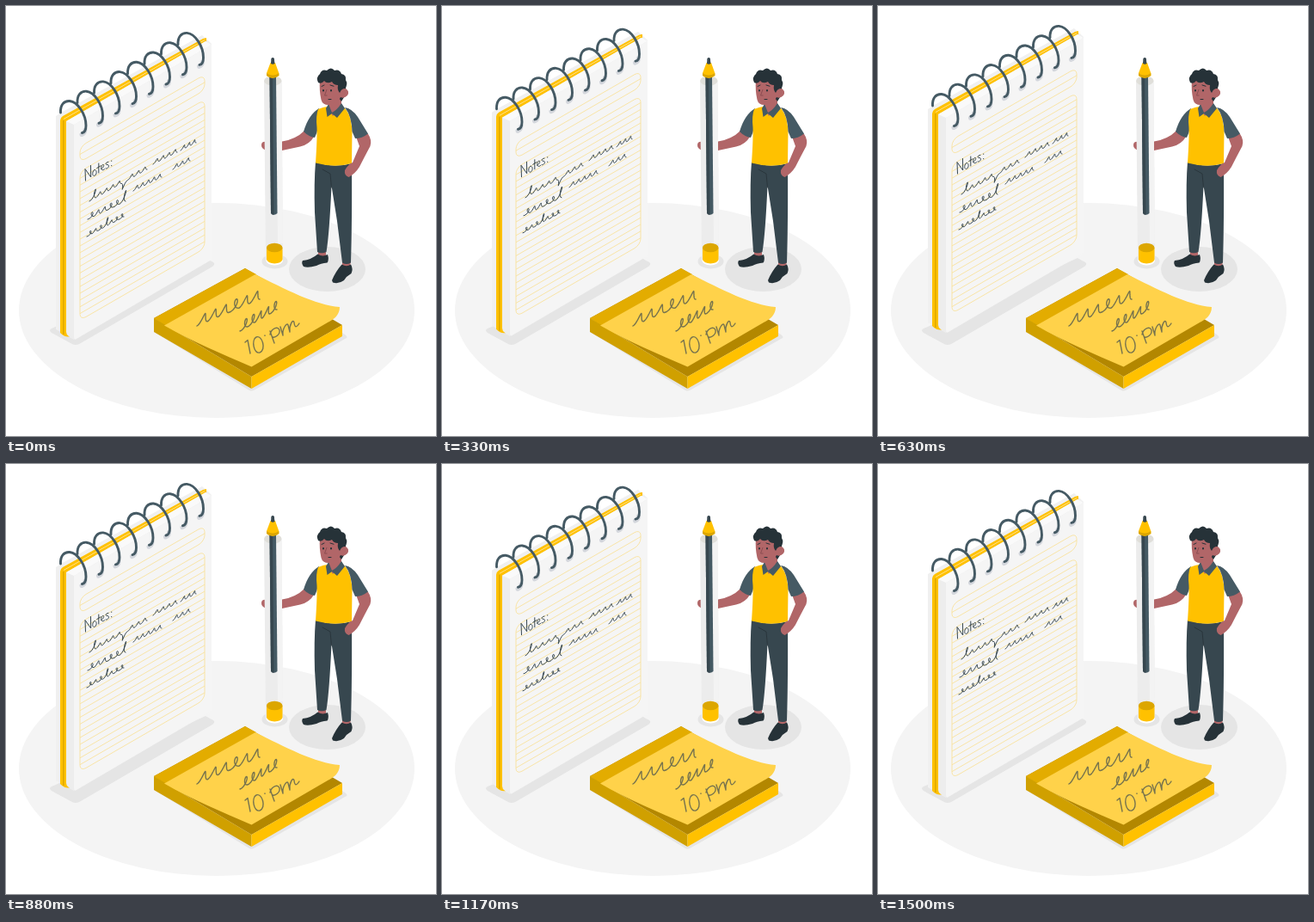
Write an HTML page that moves like this. It is 500x500 px and loops after 1.54 s.

```html
<!DOCTYPE html>
<html lang="en">
<head>
<meta charset="utf-8">
<title>Notes</title>
<style>
  html, body { margin: 0; width: 100%; height: 100%; overflow: hidden; background: #fff; }
  svg { display: block; width: 100%; height: 100%; }
  .ink { fill: none; stroke: #37474f; stroke-width: 1; stroke-linecap: round; stroke-linejoin: round; }
  .memo { stroke-width: 1.4; opacity: .68; }
  .rule { fill: none; stroke: #ffc100; stroke-width: .7; opacity: .4; }
  .line { fill: none; stroke: #263238; stroke-linecap: round; }
  .skin { fill: #b16668; }
  .navy { fill: #37474f; }
  .slate { fill: #455a64; }
  .black { fill: #263238; }
  .gold { fill: #ffc100; }
  .amber { fill: #dca600; }
  .shade { fill: #e5e5e5; }
</style>
</head>
<body>
<svg viewBox="0 0 500 500" role="img" aria-label="Notepad, pen, sticky notes and a man">
  <ellipse cx="245" cy="354" rx="230" ry="125" fill="#f4f4f4"/>
  <path class="shade" d="M53 375 L232 293 L241 298 Q244 300 240 303 L87 392 Q81 396 75 392 L53 380 Q49 377 53 375Z"/>

  <g id="pad">
    <path d="M58 128 L64 124 L228 34 L239 44 L79 388 L58 376Z" fill="#f0f0f0"/>
    <path class="gold" d="M63 133 Q63 130 66 128 L229 38 L233 37 V45 L71 138 V381 L75 384 Q69 386 63 380Z"/>
    <path d="M66.8 133 V382" fill="none" stroke="#e0a900" stroke-width="1.6"/>
    <path d="M67 131.5 L231 39.5" fill="none" stroke="#ffe08a"/>
    <path d="M70 134 L232 41 L239 45 L79 140 V388 L73 384 Q70 382 70 379Z" fill="#ededed"/>
    <path d="M70 134 L232 41 L239 45 L79 138Z" fill="#fafafa"/>
    <path d="M79 138 L239 45 V295 L82 387 Q79 389 79 385Z" fill="#f5f5f5"/>
    <g id="rules" class="rule" transform="matrix(1 -.577 0 1 86 0)"></g>
    <g id="script" class="ink">
      <path aria-label="Notes:" d="M92.5 203 L92 189.5 L98.7 199 L98.5 185.5 M103 190.5 C100 191.5 100 198 102.6 197.5 C106 196.5 106 190 103 190.5 M107.8 183 V194 M105.7 188.5 L110 185.8 M110.7 189.5 C114.5 187.5 114.3 183.5 112.3 184.5 C110 186 110 193.5 114.5 189.8 M119 181.3 C115 181.7 115.5 185 118 184.6 C121 184.5 119 189.8 116 189 M122.7 180 v.4 m0 5 v.4"/>
    </g>
    <g id="rings" fill="none" stroke-linecap="round"></g>
  </g>

  <g id="sticky">
    <path class="shade" d="M172 379 L283 447 Q285 448 288 447 L396 386 Q398 384 391 380Z"/>
    <path d="M172 363 L278 305 L391 371 L285.5 431Z" fill="#b38700"/>
    <path d="M172 363 L278 305 L291 312 L185 372Z" fill="#e3ac00"/>
    <path d="M172 363 L285.5 431 V445 L172 379Z" fill="#d0a000"/>
    <path class="gold" d="M285.5 431 L391 371 V384 L285.5 445Z"/>
    <path d="M184 371.5 L290 312 C324 329 360 348 388 350 C388 359 382 364 374 368 L285.5 419.5 C252 405 216 390 184 371.5Z" fill="#ffd24a"/>
    <g id="memo" class="ink memo">
      <path aria-label="10 pm" d="M278 391 L281 388.5 L284 404 M291 385 C285 388 288 405 295 403 C303 400 298 382 291 385 M301 383 v.4 M307 378 L312 392 M307 382 C309 374 317 372 318 377 C319 382 313 386 310 385 M319 373 L322 383 C321 375 327 367 328 371 L330 379 C329 371 334 363 335 368 Q336 377 341 369"/>
    </g>
  </g>

  <ellipse cx="373.5" cy="306" rx="44.500" ry="26" class="shade"/>
  <path class="skin" d="M303 158 Q297 157 297 162 Q297 166 303 168Z"/>

  <g id="pen">
    <ellipse class="shade" cx="312.5" cy="297" rx="15" ry="8.5"/>
    <path d="M300 87 Q310 78 320.5 87 L322 296 Q312 305 302 296Z" fill="#ececec"/>
    <path d="M314 91 L320.5 88 L322 276 H316Z" fill="#f3f3f3"/>
    <ellipse cx="310.3" cy="87" rx="10.2" ry="5.5" fill="#e0dfda"/>
    <path class="slate" d="M306.5 82 H314 L315.5 241 Q312 244.5 308 241Z"/>
    <path class="navy" d="M306.5 82 H310 L311.5 243 Q309 243 308 241Z"/>
    <path class="gold" d="M307.5 66 H313 L317.3 78 V81 Q310 86.5 303 81 V78Z"/>
    <path class="amber" d="M303 78 Q310 83 317.3 78 V81 Q310 86.5 303 81Z"/>
    <path class="navy" d="M308.3 63 Q308 60 310.2 60 Q312.3 60 312 63 L312.5 67 Q310.3 68.5 308 67Z"/>
    <ellipse cx="312.2" cy="296" rx="9.8" ry="5.4" fill="#fff"/>
    <path class="gold" d="M303 281 V295 Q305 299 312.2 299.500 Q320 299 321.5 295 V281Z"/>
    <ellipse class="amber" cx="312.2" cy="281" rx="9.3" ry="5.2"/>
  </g>

  <g id="man">
    <path class="skin" d="M363 284 H372 V292 H363Z M391 296 H400.5 V304 H391Z"/>
    <path class="black" d="M345 296 Q355 295 362.5 288.5 Q368 292 374 289 Q376 295 373.5 298.5 Q366 299 361 302 Q351 305 346 303 Q343 299 345 296Z"/>
    <path class="black" d="M379 319 Q383 309 390.5 300.5 Q396 304 401 300.5 Q404 306 401.5 311 Q396 314 393 319 Q386 324 380 321.5Z"/>
    <path class="navy" d="M360 181 Q380 189 402 183 Q402.5 250 401 298.5 Q396 301.5 391 298.5 L385 250 L378.5 209 Q376 265 372.5 286 Q367 288.5 362 286 L359 240 Q358 205 360 181Z"/>
    <path class="line" stroke-width=".8" d="M378.5 211 L377 195 L368 190"/>
    <path class="skin" d="M347 145 L358 152 Q353 161 342 163.5 L321 168 V157.5 Q337 155 347 145Z"/>
    <path class="slate" d="M364 119 Q352 126 346 146 Q352 152 359 153 Q365 142 364 119Z"/>
    <path class="gold" d="M363 120 Q370 117 375 117 H392 Q401 124 402.5 145 L402 183 Q382 188.5 360 182.5 Q362 153 361.5 141 Q360 128 363 120Z"/>
    <path class="skin" d="M407 152 L420.5 148 Q426 156 423.5 163 Q416 177 411 187 Q406 195 398.5 199 Q393 197 394 191 Q398 184 403 182 L411 163Z"/>
    <path class="slate" d="M394 118 Q402 119 409 129 L421 148.5 Q414 154 406 154 L402.5 146 Q402 128 394 118Z"/>
    <path class="skin" d="M375 108 L390 103 V116 L380 128 L375 119Z"/>
    <path class="slate" d="M375 114 L372 119 L373.5 129 L379 125 L385 130 L394 119 L390 113 Q385 121 379 124Z"/>
    <path class="black" d="M374 84 H394 Q398 101 390 111 L382 100Z"/>
    <path class="skin" d="M365 86 Q378 83 386 90 L388 100 Q390 95 395 96 Q400 99 397 104 Q393 108 389 106 Q386 114 375 115 Q368 115 366.5 109 Q364 98 365 86Z"/>
    <path class="black" d="M363 89 Q360 83 365 79 Q367 73 373 75 Q378 70 382 75 Q388 73 390 79 Q396 80 395 86 Q398 91 394 96 Q390 96 388 101 Q385 98 386 92 Q381 92 379 88 Q373 91 370 87 Q367 91 363 89Z"/>
    <path class="line" d="M367 93.5 l3 -1.5 M377 92 l4 1.2 M375 108.5 h3"/>
    <path d="M373 97 L370.5 104 h3" fill="none" stroke="#874a50" stroke-width=".9"/>
    <path class="line" stroke-width="2" d="M369 98 v.6 m9 -.6 v.6"/>
  </g>
</svg>

<script>
const $ = id => document.getElementById(id);

function add(parent, tag, attrs) {
  const el = document.createElementNS('http://www.w3.org/2000/svg', tag);
  for (const k in attrs) el.setAttribute(k, attrs[k]);
  parent.appendChild(el);
}

// Cursive strokes: one cycle each, with a height and a loop width.
const STROKES = {
  n: { rise: 1, loop: .07 },
  e: { rise: 1.1, loop: .32 },
  l: { rise: 2.4, loop: .24 },
  p: { rise: -1.8, loop: .12 }
};
const LEAN = .3, SAMPLES = 14;

// A word from (x, y) to (x2, y2), with letters of the given height.
function write(id, word, x, y, x2, y2, height) {
  const pts = [], dx = (x2 - x) / word.length, dy = (y2 - y) / word.length;
  [...word].forEach((c, i) => {
    const { rise, loop } = STROKES[c];
    for (let s = 0; s <= SAMPLES; s++) {
      const u = s / SAMPLES, a = 2 * Math.PI * u;
      const up = height * rise * (1 - Math.cos(a)) / 2;
      const px = x + dx * (i + u + loop * Math.sin(a)) + LEAN * up;
      pts.push(`${px.toFixed(2)} ${(y + dy * (i + u) - up).toFixed(2)}`);
    }
  });
  add($(id), 'path', { d: 'M' + pts.join('L') });
}

write('script', 'lnnnnpnnn', 97, 227, 164, 190, 5);
write('script', 'nnnn', 171, 184, 199, 170, 5);
write('script', 'nnn', 203, 168, 221, 159, 5);
write('script', 'enneel', 95, 248, 139, 227, 6);
write('script', 'nnnnn', 148, 215, 181, 199, 5);
write('script', 'nnn', 194, 190, 214, 180, 5);
write('script', 'enelnee', 94, 268, 137, 245, 4.5);
write('memo', 'nnnenn', 222, 372, 295, 341, 12);
write('memo', 'eenne', 272, 378, 315, 353, 11);

// Ruled panels, in the slanted plane of the page.
const rules = $('rules');
function panel(y, h, rows) {
  add(rules, 'rect', { x: 0, y, width: 145, height: h, rx: 7 });
  for (let i = 1; i < rows; i++) add(rules, 'path', { d: `M0 ${y + h * i / rows}H145` });
}
panel(163.5, 18, 2);
panel(192.5, 173, 22);

const rings = $('rings');
for (let i = 0; i < 8; i++) {
  const transform = `translate(${63.5 + 19.5 * i} ${123 - 11.3 * i})`;
  add(rings, 'path', { transform, d: 'M24.5 26.500 Q28 25.5 28.5 21', stroke: '#d3d6dc', 'stroke-width': 5 });
  add(rings, 'path', {
    transform, stroke: '#455a64', 'stroke-width': 2.9,
    d: 'M0 1C-.5 -8 4 -13 10.5 -12.5C20 -11.5 29.5 3 29.5 16C29.5 21 28 24 25 24.5'
  });
}

const LOOP = 1540, FPS = 24, LAST = 36, LIFT = 9.6;

// The pad rises and falls at constant speed, 24 poses a second.
function draw(ms) {
  const step = Math.min(LAST, Math.floor((ms % LOOP + 5) * FPS / 1000));
  const y = -LIFT * (1 - Math.abs(2 * step / LAST - 1));
  $('pad').setAttribute('transform', `translate(0 ${y.toFixed(3)})`);
}

const start = performance.now();
function tick() {
  draw(performance.now() - start);
  requestAnimationFrame(tick);
}
draw(0);
requestAnimationFrame(tick);
</script>
</body>
</html>
```
